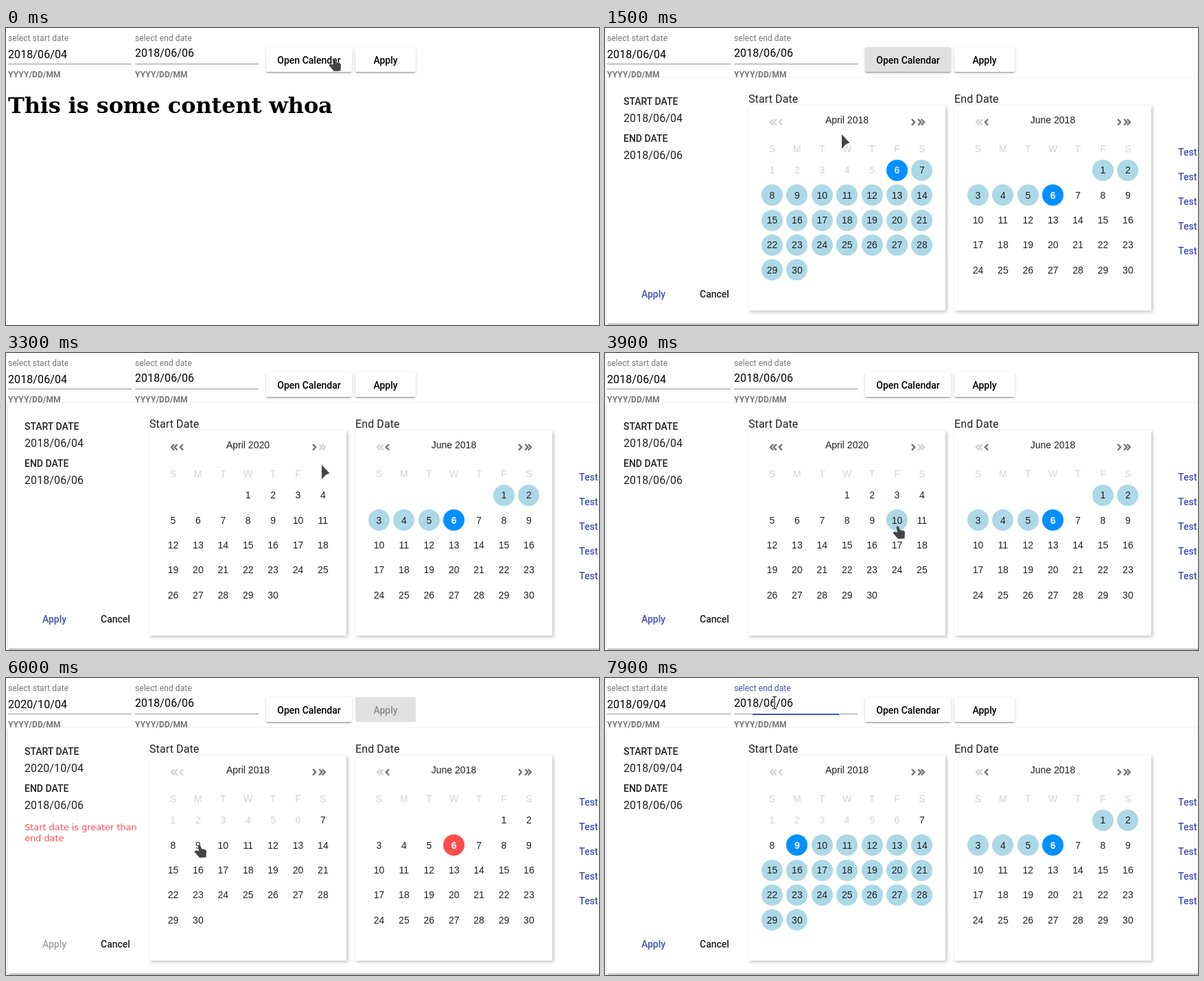
An HTML page that plays this animation: 864x433 px, repeating every 8 s.

```html
<!DOCTYPE html>
<html lang="en">
<head>
<meta charset="utf-8">
<title>Date range picker</title>
<style>
html, body { margin: 0; width: 100%; height: 100%; overflow: hidden; background: #fff; }
#stage { position: relative; width: 864px; height: 433px; overflow: hidden; background: #fff; cursor: default; }
#stage div, #stage svg { position: absolute; }
svg { left: 0; top: 0; overflow: visible; }
/* The strut puts every text baseline 40px below its top. */
.t { white-space: pre; line-height: 0; font: 16px/0 Roboto, sans-serif; letter-spacing: .1px; color: #000; }
.t::before { content: ""; display: inline-block; height: 40px; }
.label { font-size: 12px; color: #757575; }
.hint { font-size: 12px; font-weight: 700; color: #757575; }
.strong { font-size: 14px; font-weight: 500; letter-spacing: 0; }
.ink { color: #212121; }
.link { color: #3f51b5; }
.off { color: #9e9e9e; }
.heading { font: bold 32px/0 "DejaVu Serif", serif; letter-spacing: -.12px; }
.error { font: 13px/0 "DejaVu Sans", sans-serif; letter-spacing: -.06px; color: #ff4d4d; }
.cal { font: 14px/0 "Liberation Sans", Arial, sans-serif; letter-spacing: 0; color: #212121; text-align: center; }
.dim { color: #d3d3d3; }
.chosen { font-weight: 700; color: #fff; }
.chosen.dim { color: #d3e3f0; }
.button { height: 36px; top: 28px; border-radius: 2px; overflow: hidden; }
.panel { left: 3px; top: 73px; width: 900px; height: 358px; background: #fff;
  box-shadow: 0 3px 1px -2px rgba(0,0,0,.2), 0 2px 2px rgba(0,0,0,.14), 0 1px 5px rgba(0,0,0,.12); }
.card { top: 113px; width: 287px; height: 299px; background: #fff; box-shadow: 2px 2px 5px rgba(0,0,0,.25); }
.dot { width: 31px; height: 31px; border-radius: 50%; }
</style>
</head>
<body>
<div id="stage"></div>
<script>
const LOOP = 8000, TICK = 100;
const BLUE = '#0090ff', RED = '#ff4d4d', RANGE = '#add8e6';
const MONTHS = { 3: 'April', 5: 'June' };

// time, x, y, shape
const POINTER = [
  [0, 478, 44, 'hand'], [1000, 478, 44, 'hand'], [1100, 466, 62, 'hand'], [1200, 425, 92, 'arrow'],
  [1400, 312, 138, 'arrow'], [1500, 345, 155, 'arrow'], [1900, 511, 186, 'arrow'], [2000, 507, 184, 'arrow'],
  [2400, 466, 146, 'hand'], [2600, 464, 140, 'hand'], [3200, 464, 140, 'hand'], [3300, 460, 163, 'arrow'],
  [3500, 451, 214, 'hand'], [3700, 428, 254, 'hand'], [3900, 427, 252, 'hand'], [4100, 427, 253, 'hand'],
  [4600, 427, 253, 'hand'], [4700, 447, 230, 'hand'], [4800, 476, 190, 'arrow'], [5000, 380, 140, 'arrow'],
  [5300, 246, 137, 'hand'], [5500, 246, 137, 'hand'], [5600, 250, 152, 'arrow'], [5800, 268, 208, 'hand'],
  [6000, 282, 243, 'hand'], [6400, 282, 245, 'hand'], [6600, 272, 185, 'arrow'], [7000, 252, 85, 'arrow'],
  [7200, 258, 45, 'ibeam'], [7300, 265, 33, 'ibeam'], [7700, 247, 36, 'ibeam'], [8000, 247, 36, 'ibeam']
];
const SHAPES = {
  hand: 'M-2.5 2Q-1 -1 1 1L3 6 8 7Q10 8 10 10L9.500 18.500 0 19 -7 11Q-8 8 -4 8.500L-1 9.500Z',
  arrow: 'M0 0L11.500 12.500 8 13.500 5 15.500 0 21Z'
};
const HOVER_DAYS = [[3500, 3600, 4], [3700, 4000, 10], [6100, 6300, 9]];

const clamp = v => Math.max(0, Math.min(1, v));
const ramp = (t, from, to) => 1 - (1 - clamp((t - from) / (to - from))) ** 3;
const within = (t, from, to) => t >= from && t < to;
const black = alpha => `rgba(0,0,0,${alpha})`;
const text = (x, base, str, cls = '', style = '') =>
  `<div class="t ${cls}" style="left:${x}px;top:${base - 40}px;${style}">${str}</div>`;
const centered = (x, base, str, cls = '') => text(x - 60, base, str, 'cal ' + cls, 'width:120px');
const box = (x, y, w, h, color) =>
  `<div style="left:${x}px;top:${y}px;width:${w}px;height:${h}px;background:${color}"></div>`;
const dateText = d =>
  [d.getFullYear(), ...[d.getDate(), d.getMonth() + 1].map(n => String(n).padStart(2, '0'))].join('/');

function stateAt(t) {
  const start = t < 4100 ? new Date(2018, 3, 6) : t < 6400 ? new Date(2020, 3, 10) : new Date(2018, 3, 9);
  const end = new Date(2018, 5, 6);
  const year = within(t, 2800, 3000) || within(t, 5300, 5500) ? 2019 : within(t, 3000, 5300) ? 2020 : 2018;
  const hover = HOVER_DAYS.find(([a, b]) => t >= a && t <= b);
  return { start, end, year, invalid: start > end, hoverDay: hover && hover[2] };
}

function chevrons(x, dir, double, color) {
  const one = dx => `M${x + dx + 2 * dir} 133l${-4.2 * dir} 4.300 ${4.2 * dir} 4.300`;
  return `<path d="${double ? one(-2.3) + one(2.3) : one(0)}" fill="none" stroke="${color}" stroke-width="2.400"/>`;
}

function arrows(left, blocked, hovered) {
  const items = [[36.5, 1, true], [47, 1, false], [240, -1, false], [251.5, -1, true]];
  return '<svg width="864" height="433">' + items.map(([x, dir, double], i) =>
    chevrons(left + x, dir, double,
      blocked.includes(i) ? '#d3d3d3' : hovered === i ? '#212121' : '#757575')).join('') + '</svg>';
}

function calendar(left, year, month, s, opts) {
  const first = new Date(year, month, 1).getDay();
  const colX = c => left + 34.5 + 36.4 * c;
  let out = `<div class="card" style="left:${left}px"></div>`
    + centered(left + 143.5, 139, `${MONTHS[month]} ${year}`)
    + arrows(left, opts.blocked, opts.hovered);
  [...'SMTWTFS'].forEach((d, c) => out += centered(colX(c), 181, d, 'dim'));
  for (let day = 1; day <= 30; day++) {
    const date = new Date(year, month, day), slot = first + day - 1;
    const x = colX(slot % 7), y = 207.2 + 36.4 * Math.floor(slot / 7);
    const chosen = +date === +opts.selected;
    const inRange = opts.showRange && date > s.start && date < s.end;
    const fill = chosen ? (s.invalid ? RED : BLUE) : inRange || day === opts.hoverDay ? RANGE : '';
    if (fill) out += `<div class="dot" style="left:${x - 15.5}px;top:${y - 15.5}px;background:${fill}"></div>`;
    out += centered(x, Math.round(y) + 5, day,
      (chosen ? 'chosen ' : '') + (date < new Date(2018, 3, 7) ? 'dim' : ''));
  }
  return out;
}

function button(x, w, label, { shade = 0, ink = 1, lift = 1, ripple = '' } = {}) {
  const shadow = `0 3px 1px -2px ${black(.2 * lift)},0 2px 2px ${black(.14 * lift)},0 1px 5px ${black(.12 * lift)}`;
  const tint = `linear-gradient(${black(shade)},${black(shade)}),#fff`;
  return `<div class="button" style="left:${x}px;width:${w}px;background:${tint};box-shadow:${shadow}">${ripple}</div>`
    + text(x, 52, label, 'strong', `width:${w}px;text-align:center;color:${black(ink)}`);
}

function toolbar(t, s) {
  const focused = t >= 7900;
  const r = 110 * ramp(t, 400, 900);
  const ripple = within(t, 500, 1300)
    ? `<div style="left:${99 - r}px;top:${17 - r}px;width:${2 * r}px;height:${2 * r}px;border-radius:50%;background:${black(.1 * (1 - clamp((t - 800) / 400)))}"></div>` : '';
  const shade = .12 * (ramp(t, 400, 800) - clamp((t - 2500) / 240));
  const off = ramp(t, 4100, 4500) - ramp(t, 6400, 6800);
  return text(3, 19, 'select start date', 'label')
    + text(188, 19, 'select end date', 'label ' + (focused ? 'link' : ''))
    + text(3, 44, dateText(s.start)) + text(188, 42, dateText(s.end))
    + box(3, 52, 180, 1, '#949494') + box(188, 52, 180, 1, '#949494')
    + (focused ? box(215, 52, 126, 2, '#3f51b5') : '')
    + text(3, 72, 'YYYY/DD/MM', 'hint') + text(188, 72, 'YYYY/DD/MM', 'hint')
    + text(3, 124, 'This is some content whoa', 'heading')
    + button(379, 125, 'Open Calendar', { shade, ripple })
    + button(509, 88, 'Apply', { shade: .12 * off, ink: 1 - .62 * off, lift: 1 - off });
}

function panel(t, s) {
  const hovered = within(t, 2500, 3000) ? 3 : within(t, 5200, 5500) ? 0 : -1;
  const blocked = { 2018: [0, 1], 2019: [], 2020: [3] }[s.year];
  let out = '<div class="panel"></div>'
    + text(27, 112, 'START DATE', 'strong ink') + text(27, 137, dateText(s.start), 'ink')
    + text(27, 166, 'END DATE', 'strong ink') + text(27, 191, dateText(s.end), 'ink')
    + text(53, 393, 'Apply', 'strong ' + (s.invalid ? 'off' : 'link')) + text(138, 393, 'Cancel', 'strong ink')
    + text(209, 109, 'Start Date', 'ink') + text(509, 109, 'End Date', 'ink');
  if (s.invalid) out += text(27, 222, 'Start date is greater than', 'error') + text(27, 238, 'end date', 'error');
  out += calendar(209, s.year, 3, s, { selected: s.start, showRange: true, hoverDay: s.hoverDay, blocked, hovered })
    + calendar(509, 2018, 5, s, { selected: s.end, showRange: t !== 6400, blocked: [0], hovered: -1 });
  for (let i = 0; i < 5; i++) out += text(835, 186 + 36 * i, 'Test', 'strong link');
  return out;
}

function pointer(t) {
  const i = POINTER.findIndex(k => k[0] > t);
  const [t0, x0, y0, shape] = POINTER[i - 1], [t1, x1, y1] = POINTER[i];
  const u = (t - t0) / (t1 - t0);
  const x = x0 + (x1 - x0) * u, y = y0 + (y1 - y0) * u;
  const bar = 'M-3 -9Q0 -9 0 -7Q0 -9 3 -9M0 -7V7M-3 9Q0 9 0 7Q0 9 3 9';
  const art = shape === 'ibeam'
    ? `<path d="${bar}" fill="none" stroke="#fff" stroke-width="3"/><path d="${bar}" fill="none" stroke="#333" stroke-width="1.3"/>`
    : `<path d="${SHAPES[shape]}" fill="#444" stroke="#fff" stroke-width="1" stroke-linejoin="round" paint-order="stroke"/>`;
  return `<svg width="864" height="433"><g transform="translate(${x} ${y})">${art}</g></svg>`;
}

const stage = document.getElementById('stage');
let shown = -1;
function draw(now) {
  const t = Math.floor((now % LOOP) / TICK) * TICK;
  if (t !== shown) {
    shown = t;
    const s = stateAt(t);
    stage.innerHTML = toolbar(t, s) + (t >= 500 ? panel(t, s) : '') + pointer(t);
  }
}
const origin = performance.now();
function loop() {
  draw(performance.now() - origin);
  requestAnimationFrame(loop);
}
loop();
</script>
</body>
</html>
```
